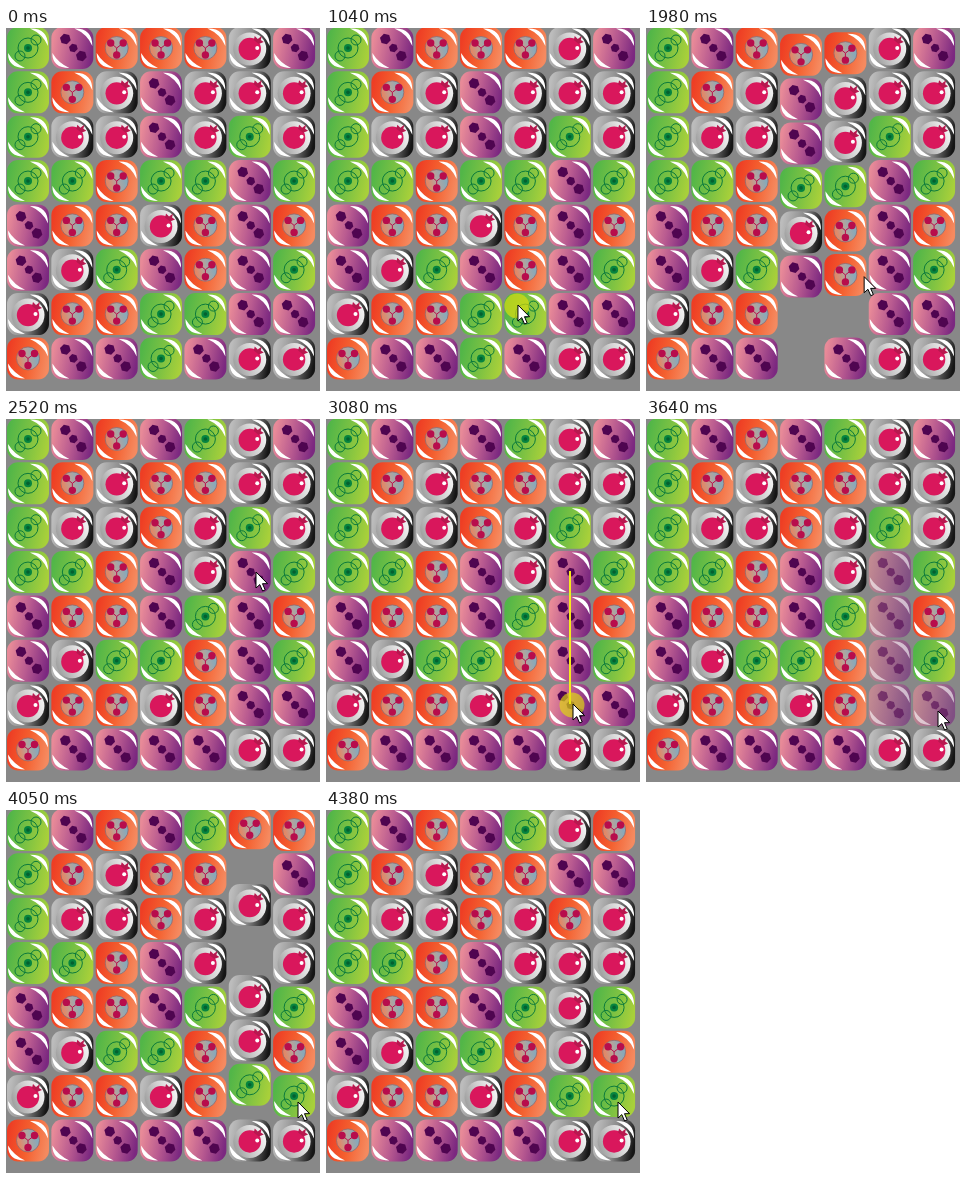
These frames come from a looping animation (314 px wide and 363 px high, 4430 ms). An HTML page with a canvas:

```html
<!DOCTYPE html>
<html lang="en">
<head>
<meta charset="utf-8">
<title>Tile matching game</title>
<style>
html, body { margin: 0; overflow: hidden; background: #888; }
canvas { display: block; }
</style>
</head>
<body>
<canvas id="stage" width="314" height="363"></canvas>
<script>
const ctx = document.getElementById('stage').getContext('2d');
const LOOP = 4430, PITCH = 44.35, FADE = 126;
const colX = c => 22 + c * PITCH;
const rowY = r => 20 + r * PITCH;
const clamp = p => Math.max(0, Math.min(1, p));
const easeInOut = p => (1 - Math.cos(Math.PI * p)) / 2;

// Columns, top to bottom: Green, Purple, Orange, Silver
const columns = ['GGGGPPSO', 'POSGOSOP', 'OSSOOGOP', 'OPPGSPGG', 'OSSGOOGP', 'SSGPPPPS', 'PSSGOGPS'];

// Per column: first cleared row, new tiles, start of the fall
const clears = {
  3: { row: 6, fresh: 'PO', at: 1929 },
  4: { row: 6, fresh: 'G', at: 1929 },
  5: { row: 3, fresh: 'SPOS', at: 3716 },
  6: { row: 6, fresh: 'O', at: 3716 }
};

// Drags: pressed from, released at, then column, row and joining time of each tile
const drags = [
  { from: 860, to: 1610, cells: [[4, 6, 860], [3, 6, 1215], [3, 7, 1500]] },
  { from: 2608, to: 3435, cells: [[5, 3, 2608], [5, 4, 2676], [5, 5, 2793], [5, 6, 2920], [6, 6, 3255]] }
];

// Pointer: time, x, y, joined by a smooth curve
const pointer = [
  [220, 243, 366], [720, 199, 275], [860, 199, 275], [1040, 192, 277], [1370, 154, 281],
  [1610, 155, 327], [1740, 155, 327], [1980, 218, 249], [2250, 247, 168], [2520, 250, 153],
  [3040, 247, 285], [3080, 247, 285], [3430, 292, 292]
];

const shades = {
  G: ['#52b648', '#7ac143', '#a8d03a'],
  P: ['#e88a98', '#b85a90', '#7b2880'],
  O: ['#ee3e24', '#f4602f', '#f58a60'],
  S: ['#bcbcbc', '#8c8c8c', '#151515']
};

function gradient(x0, y0, x1, y1, colors) {
  const g = ctx.createLinearGradient(x0, y0, x1, y1);
  colors.forEach((c, i) => g.addColorStop(i / (colors.length - 1), c));
  return g;
}

function disc(x, y, r, fill) {
  ctx.beginPath();
  ctx.arc(x, y, r, 0, 7);
  ctx.fillStyle = fill;
  ctx.fill();
}

function ring(x, y, r, color, width = 1) {
  ctx.beginPath();
  ctx.arc(x, y, r, 0, 7);
  ctx.strokeStyle = color;
  ctx.lineWidth = width;
  ctx.stroke();
}

function hexagon(x, y, r) {
  ctx.beginPath();
  for (let i = 0; i < 6; i++) {
    const a = i * Math.PI / 3 + 0.25;
    ctx.lineTo(x + r * Math.cos(a), y + r * Math.sin(a));
  }
  ctx.fillStyle = '#4f0550';
  ctx.fill();
}

const symbols = {
  G() {
    ring(0, 0, 10, '#0b7a3c');
    ring(-8, 8, 5, '#0b7a3c');
    ring(8, -8, 5, '#0b7a3c');
    disc(0, 0, 4, '#06843f');
    disc(0, 0, 1.8, '#04602f');
  },
  P() {
    hexagon(-7, -9, 5.5);
    hexagon(1, 0, 4.5);
    hexagon(9, 8, 5.5);
  },
  O() {
    disc(0, 0, 11.5, gradient(-10, 3, 9, -2, ['#e58562', '#b5a49c', '#86a9ba']));
    ring(0, 0, 11.5, '#8d6a70', 0.8);
    ctx.strokeStyle = '#b80d4c';
    ctx.lineWidth = 1;
    for (const [x, y] of [[-6, -5], [6.5, -5], [0, 7]]) {
      ctx.beginPath();
      ctx.moveTo(0, 0);
      ctx.lineTo(x, y);
      ctx.stroke();
      disc(x, y, 3.7, '#b80d4c');
    }
  },
  S() {
    disc(0, 1, 16.5, gradient(-15, 6, 15, -6, ['#a2a2a2', '#d0d0d0', '#f4f4f4']));
    disc(0, 1, 11.2, '#d9175c');
    ctx.beginPath();
    [[4, -8], [5, -12], [8, -9], [12, -12], [11, -8], [14, -6], [9, -4]].forEach(p => ctx.lineTo(...p));
    ctx.fillStyle = '#b8184f';
    ctx.fill();
    disc(7.5, 0, 2, '#fff');
  }
};

function gloss() {
  ctx.fillStyle = '#fff';
  ctx.beginPath();
  ctx.moveTo(2, -19.5);
  ctx.quadraticCurveTo(20, -20, 20, -2);
  ctx.quadraticCurveTo(15, -14, 2, -19.5);
  ctx.fill();
  ctx.beginPath();
  ctx.moveTo(-20, 5);
  ctx.quadraticCurveTo(-20, 20, -3, 20);
  ctx.quadraticCurveTo(-14, 15, -20, 5);
  ctx.fill();
}

function tile(kind, col, row, alpha = 1) {
  ctx.save();
  ctx.translate(colX(col), rowY(row));
  ctx.globalAlpha = alpha;
  ctx.beginPath();
  ctx.roundRect(-21, -21, 42, 42, 11);
  ctx.fillStyle = gradient(-20, -4, 20, 4, shades[kind]);
  ctx.fill();
  gloss();
  symbols[kind]();
  ctx.restore();
}

// Rows fallen after a given time, out of n
const fall = (n, time) => n * easeInOut(clamp(time / (180 + 55 * n)));

function drawColumn(kinds, col, t) {
  const clear = clears[col];
  const n = clear ? clear.fresh.length : 0;
  const time = clear ? t - clear.at : 0;
  [...kinds].forEach((kind, row) => {
    if (!clear || row >= clear.row + n) tile(kind, col, row);
    else if (row < clear.row) tile(kind, col, row + fall(n, time));
    else if (time < 0) tile(kind, col, row, clamp(-time / FADE));
  });
  for (let row = 0; row < n; row++) {
    const delay = 90 + 113 * (n - 1 - row);
    if (time > delay) tile(clear.fresh[row], col, fall(row + 1, time - delay) - 1);
  }
}

// Slope between two pointer points; axis 1 is x, 2 is y
function slope(i, axis) {
  const a = pointer[i], b = pointer[i + 1];
  return a && b ? (b[axis] - a[axis]) / (b[0] - a[0]) : 0;
}

// Tangent that never overshoots: zero at turns and stops
function tangent(i, axis) {
  const a = slope(i - 1, axis), b = slope(i, axis);
  return a * b > 0 ? 2 * a * b / (a + b) : 0;
}

function pointerAt(t) {
  const next = pointer.findIndex(p => p[0] > t);
  if (next === 0) return pointer[0].slice(1);
  if (next < 0) return pointer.at(-1).slice(1);
  const i = next - 1, a = pointer[i], b = pointer[next];
  const span = b[0] - a[0], p = (t - a[0]) / span, q = 1 - p;
  return [1, 2].map(axis =>
    q * q * (1 + 2 * p) * a[axis] + p * p * (3 - 2 * p) * b[axis] +
    span * p * q * (q * tangent(i, axis) - p * tangent(next, axis)));
}

function drawDrag(t, x, y) {
  const drag = drags.find(d => t >= d.from && t < d.to);
  if (!drag) return;
  ctx.beginPath();
  for (const [c, r, at] of drag.cells) {
    if (t >= at) ctx.lineTo(Math.round(colX(c)), Math.round(rowY(r)) - 1);
  }
  ctx.strokeStyle = '#f6ea1c';
  ctx.lineWidth = 2;
  ctx.stroke();
  disc(x - 1, y + 1, 12.5, 'rgba(228, 222, 10, 0.65)');
}

function drawPointer(x, y) {
  ctx.beginPath();
  [[0, 0], [0, 16], [3.8, 12.6], [6.6, 19], [9.2, 17.9], [6.5, 11.7], [11.6, 11.7]]
    .forEach(([dx, dy]) => ctx.lineTo(x + dx, y + dy));
  ctx.closePath();
  ctx.fillStyle = '#fff';
  ctx.fill();
  ctx.strokeStyle = '#000';
  ctx.lineWidth = 1;
  ctx.stroke();
}

function frame() {
  const t = performance.now() % LOOP;
  ctx.fillStyle = '#888';
  ctx.fillRect(0, 0, 314, 363);
  columns.forEach((kinds, col) => drawColumn(kinds, col, t));
  const [x, y] = pointerAt(t);
  drawDrag(t, x, y);
  drawPointer(x, y);
  requestAnimationFrame(frame);
}
frame();
</script>
</body>
</html>
```
